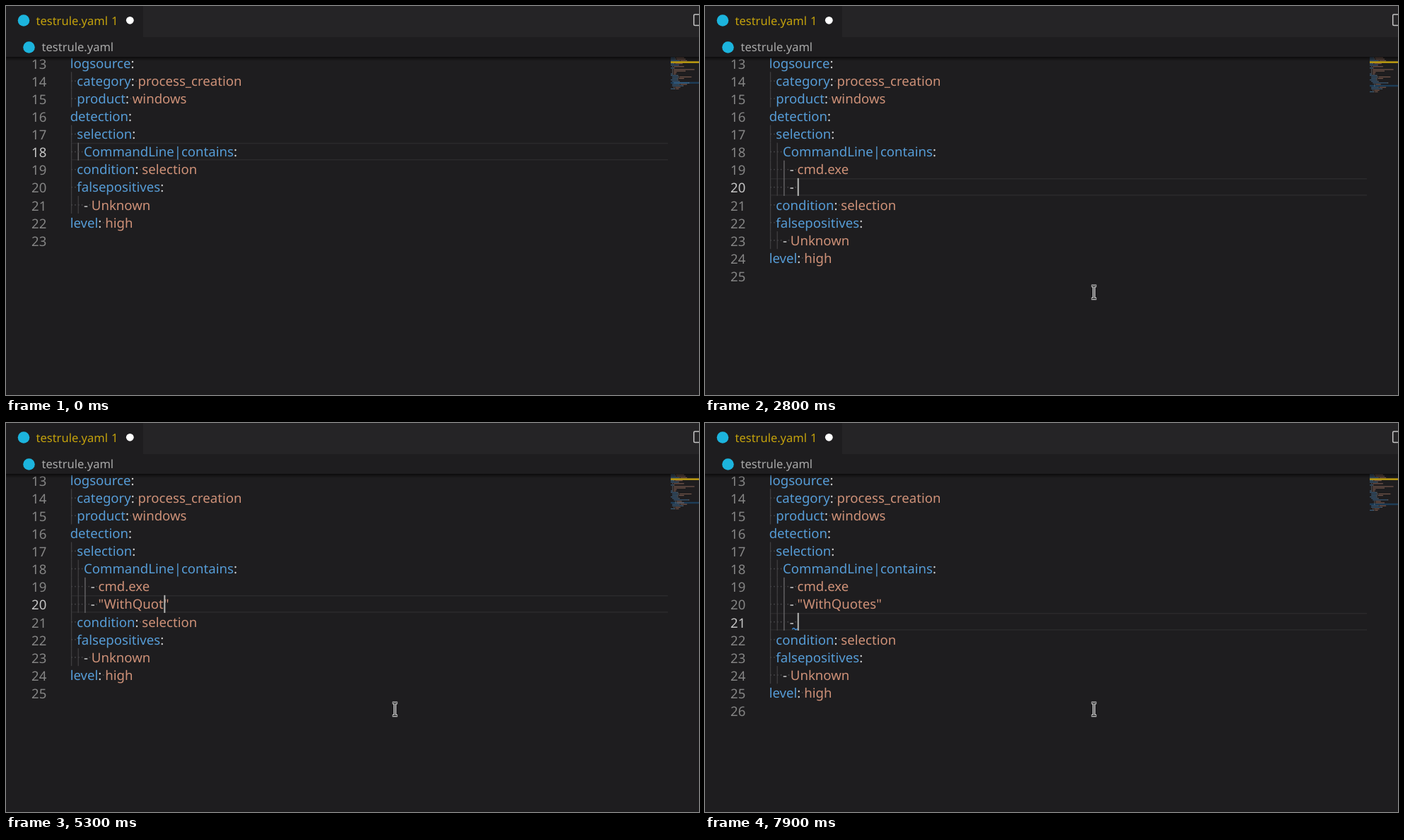
Animation, 980 px wide and 551 px high, one loop 8 s. Source, as an HTML page:

```html
<!DOCTYPE html>
<html lang="en">
<head>
<meta charset="utf-8">
<title>YAML rule editor</title>
<style>
  html, body { margin: 0; width: 100%; height: 100%; overflow: hidden; background: #1e1d1f; }
  svg { display: block; width: 980px; height: 551px; }
  text { font-family: "Noto Sans", sans-serif; text-rendering: geometricPrecision; }
  .code { font-size: 18.6px; }
  .ui { font-size: 16.5px; }
</style>
</head>
<body>
<svg viewBox="0 0 980 551">
  <defs>
    <linearGradient id="shade" x2="0" y2="1">
      <stop offset="0" stop-color="#000" stop-opacity=".6"/>
      <stop offset="1" stop-color="#000" stop-opacity="0"/>
    </linearGradient>
    <clipPath id="pane"><rect y="72" width="980" height="479"/></clipPath>
  </defs>
  <rect width="980" height="551" fill="#1e1d1f"/>
  <g clip-path="url(#pane)">
    <g id="editor" class="code"></g>
    <g id="minimap"></g>
  </g>
  <rect y="72" width="980" height="6" fill="url(#shade)"/>

  <rect x="194" width="786" height="44" fill="#252426"/>
  <circle cx="25" cy="20.5" r="8.3" fill="#1cb4dd"/>
  <circle cx="32.5" cy="58.5" r="8.3" fill="#1cb4dd"/>
  <g class="ui">
    <text x="42.5" y="27" fill="#c4a20c">testrule.yaml</text>
    <text x="149" y="27" fill="#c4a20c">1</text>
    <text x="50.6" y="64" fill="#a9a9a9">testrule.yaml</text>
  </g>
  <circle cx="175.3" cy="20.3" r="5.4" fill="#fff"/>
  <rect x="972.7" y="12" width="17" height="15.5" rx="1.5" fill="none" stroke="#c5c5c5" stroke-width="1.5"/>

  <g id="mouse" fill="none">
    <path id="beam" d="M-3.5-9H3.5M0-9V9M-3.5 9H3.5" stroke="#f4f4f4" stroke-width="3.6"/>
    <path d="M-3.2-9H3.2M0-9V9M-3.2 9H3.2" stroke="#222" stroke-width="1.3"/>
  </g>
</svg>
<script>
const LOOP = 8000, LINE = 25.08, LEFT = 90.7, INDENT = 9.67, FIRST = 13;
const KEY = '#569cd6', STR = '#ce9178', PLAIN = '#d4d4d4';
const $ = id => document.getElementById(id);
const editor = $('editor'), minimap = $('minimap'), mouse = $('mouse');

const top_ = n => 193.7 + (n - 18) * LINE;
const base = n => top_(n) + 19.6;

function add(parent, name, attrs, text) {
  const node = document.createElementNS('http://www.w3.org/2000/svg', name);
  for (const k in attrs) node.setAttribute(k, attrs[k]);
  if (text) node.textContent = text.replace(/ /g, '\u00a0');
  return parent.appendChild(node);
}
const box = (parent, x, y, width, height, fill) =>
  add(parent, 'rect', { x, y, width, height, fill });

// Part of the file above the visible lines, seen only in the minimap
const head = [
  'title: Sample Rule', 'status: experimental', 'description: For tests', '',
  'date: 2022/01/01', 'references:', '  - internal notes', 'tags:',
  '  - attack.defense_evasion.basic', '  - attack.execution', '  - demo', 'id: 100'
];
const before = [
  'logsource:', '  category: process_creation', '  product: windows',
  'detection:', '  selection:'
];
const after = ['  condition: selection', '  falsepositives:', '    - Unknown', 'level: high', ''];

// Each step: time, text typed after "contains:", state.
// "^" is the visible caret, "_" the hidden one.
const steps = [];
const step = (t, text, state = '') => steps.push([t, text, state]);
const type = (pre, word, post, times) =>
  times.forEach((t, i) => step(t, pre + word.slice(0, i + 1) + '^' + post));

step(0, '_');
step(200, '^');
step(700, '_');
step(900, '\n^');
step(1300, '\n- ^');
type('\n- ', 'cmd.exe', '', [1600, 1700, 1800, 1900, 2100, 2200, 2400]);
const one = '\n- cmd.exe\n- ';
step(2500, one + '^');
step(3100, one + '_');
type(one, '"With', '"', [3500, 3700, 3900, 4000, 4200]);
type(one + '"With', 'Quotes', '"', [4500, 4700, 5000, 5300, 5400, 5500]);
const two = one + '"WithQuotes"\n- ';
step(5900, two + '"^"');
step(6500, two + '"_"');
step(6900, two + '^"', 'open');
step(7400, two + '^');
step(7800, two + '^', 'hint');

// Splits a line into [text, colour] pieces
function tokens(line, open) {
  if (open) return [[line, STR]];
  const [, pad, rest] = line.match(/^( *)(.*)$/);
  if (rest[0] === '-') return [[pad + '-', PLAIN], [rest.slice(1), STR]];
  const [key, value] = rest.split(':');
  return value === undefined ? [[line, STR]]
    : [[pad + key, KEY], [':', PLAIN], [value, STR]];
}

const depth = line => line.match(/^ */)[0].length / 2;

function drawLine(line, n, open) {
  if (!line) return null;
  const text = add(editor, 'text', { x: LEFT, y: base(n) });
  for (const [part, fill] of tokens(line, open)) {
    if (part) add(text, 'tspan', { fill }, part);
  }
  [...line].forEach((ch, i) => {
    if (ch !== ' ') return;
    const cx = (text.getStartPositionOfChar(i).x + text.getEndPositionOfChar(i).x) / 2;
    add(editor, 'circle', { cx, cy: base(n) - 6.8, r: 0.95, fill: '#464548' });
  });
  return text;
}

function drawMinimap(lines, current) {
  const pitch = 2.1, char = 1.05;
  minimap.replaceChildren();
  const y = i => 72.2 + i * pitch;
  box(minimap, 940, y(current - 1) - 0.3, 40, 2.4, '#1d3d58');
  [...head, ...lines].forEach((line, i) => {
    let col = 0;
    for (const [part, fill] of tokens(line)) {
      const ink = part.trim().length, skip = part.length - part.trimStart().length;
      if (ink) box(minimap, 940 + (col + skip) * char, y(i) + 0.4, ink * char, 1.2, fill)
        .setAttribute('opacity', 0.5);
      col += part.length;
    }
  });
  box(minimap, 940, y(3) - 0.1, 40, 2.4, '#c4a10f');
}

function draw([, tail, state]) {
  const typed = ('CommandLine|contains:' + tail).split('\n')
    .map((s, i) => ' '.repeat(i ? 6 : 4) + s);
  const row = typed.findIndex(s => /[\^_]$|[\^_]"/.test(s));
  const caret = typed[row].search(/[\^_]"?$/);
  const visible = typed[row][caret] === '^';
  typed[row] = typed[row].replace(/[\^_](?="?$)/, '');

  const lines = [...before, ...typed, ...after];
  const current = 18 + row, at = current - FIRST;
  const openFrom = state === 'open' ? at : Infinity;
  editor.replaceChildren();

  for (const dy of [0.1, 23.3]) box(editor, 92, top_(current) + dy, 844, 1.5, '#2b2a2c');

  // Indent guides; the block around the caret is brighter
  const level = depth(lines[at]) - 1;
  let from = at, to = at;
  while (depth(lines[from - 1]) > level) from--;
  while (depth(lines[to + 1]) > level) to++;
  lines.forEach((line, i) => {
    for (let d = 0; d < depth(line); d++) {
      const active = d === level && i >= from && i <= to;
      box(editor, LEFT + 1.2 + d * INDENT, top_(FIRST + i), 1.3, LINE, active ? '#6c6b6d' : '#3f3e40');
    }
  });

  lines.forEach((line, i) => {
    const n = FIRST + i;
    add(editor, 'text', {
      x: 57.3, y: base(n) + 1, 'text-anchor': 'end', fill: n === current ? '#c6c6c6' : '#858585'
    }, String(n));
    const open = i > openFrom;
    const text = drawLine(line, n, open);
    if (n !== current) return;
    const x = text.getEndPositionOfChar(caret - 1).x;
    if (visible) box(editor, x + 0.2, top_(n), 2, LINE, '#b4b5b3');
    if (state === 'hint') add(editor, 'path', {
      d: `M${x - 7} ${top_(n) + 23.4}q1.7-3 3.5-.6t3.5-.6`,
      fill: 'none', stroke: '#3f8fd8', 'stroke-width': 1.4
    });
  });
  drawMinimap(lines, current);
}

const start = performance.now();
let shown = null;

function tick() {
  const t = Math.max(0, performance.now() - start) % LOOP;
  const now = steps.findLast(s => s[0] <= t);
  if (now !== shown) draw(shown = now);
  mouse.setAttribute('visibility', t < 100 ? 'hidden' : 'visible');
  mouse.setAttribute('transform', `translate(550 ${t < 200 ? 425 : 405.5})`);
  requestAnimationFrame(tick);
}
tick();
</script>
</body>
</html>
```
